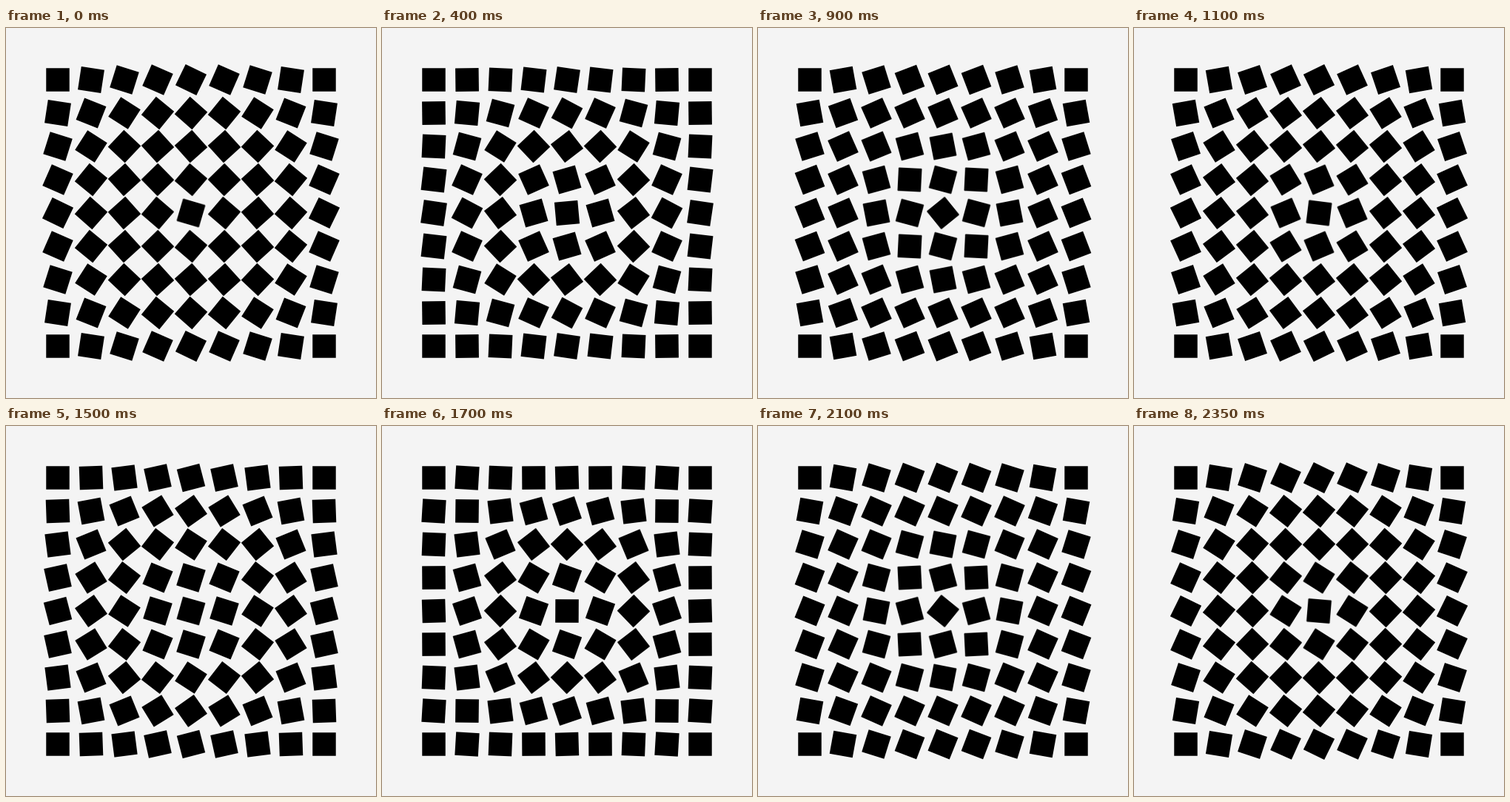
Animation of 500x500 px, one loop 2.4 s. Source, as an HTML page with a canvas:

```html
<!DOCTYPE html>
<html lang="en">
<head>
<meta charset="utf-8">
<title>Twisting squares</title>
<style>
  html, body { margin: 0; width: 100%; height: 100%; overflow: hidden; background: #f4f4f4; }
  canvas { display: block; width: 500px; height: 500px; }
</style>
</head>
<body>
<canvas id="stage" width="500" height="500"></canvas>
<script>
const ctx = document.getElementById('stage').getContext('2d');
const LOOP = 2400, STEP = 50;
const HALF = 4, GAP = 45, SIZE = 31.5;
const REACH = Math.hypot(HALF, HALF);
const SWING = Math.PI / 2;   // largest turn, at the centre
const PEAK = 530;            // time of the centre's largest turn
const LEAD = 856;            // how far the corners run ahead of the centre
const SAMPLES = 8, SHUTTER = 30;

// Turn of a square at a given grid distance from the centre
function turn(dist, ms) {
  const d = dist / REACH;
  return SWING * (1 - d) * Math.cos(2 * Math.PI * (ms - PEAK + LEAD * d) / LOOP);
}

function drawSquare(col, row, ms) {
  const a = turn(Math.hypot(col, row), ms);
  const c = Math.cos(a), s = Math.sin(a);
  ctx.setTransform(c, s, -s, c, 250 + col * GAP, 250 + row * GAP);
  ctx.fillRect(-SIZE / 2, -SIZE / 2, SIZE, SIZE);
}

// Motion blur: add up faint layers spread over the shutter time
function draw(ms) {
  ctx.setTransform(1, 0, 0, 1, 0, 0);
  ctx.clearRect(0, 0, 500, 500);
  ctx.globalCompositeOperation = 'lighter';
  ctx.globalAlpha = 1 / SAMPLES;
  ctx.fillStyle = '#000';
  for (let i = 0; i < SAMPLES; i++) {
    const at = ms + SHUTTER * ((i + 0.5) / SAMPLES - 0.5);
    for (let row = -HALF; row <= HALF; row++)
      for (let col = -HALF; col <= HALF; col++) drawSquare(col, row, at);
  }
}

let shown = -1;
function tick(now) {
  const ms = Math.floor(((now + 1) % LOOP) / STEP) * STEP;
  if (ms !== shown) draw(shown = ms);
  requestAnimationFrame(tick);
}
tick(performance.now());
</script>
</body>
</html>
```
